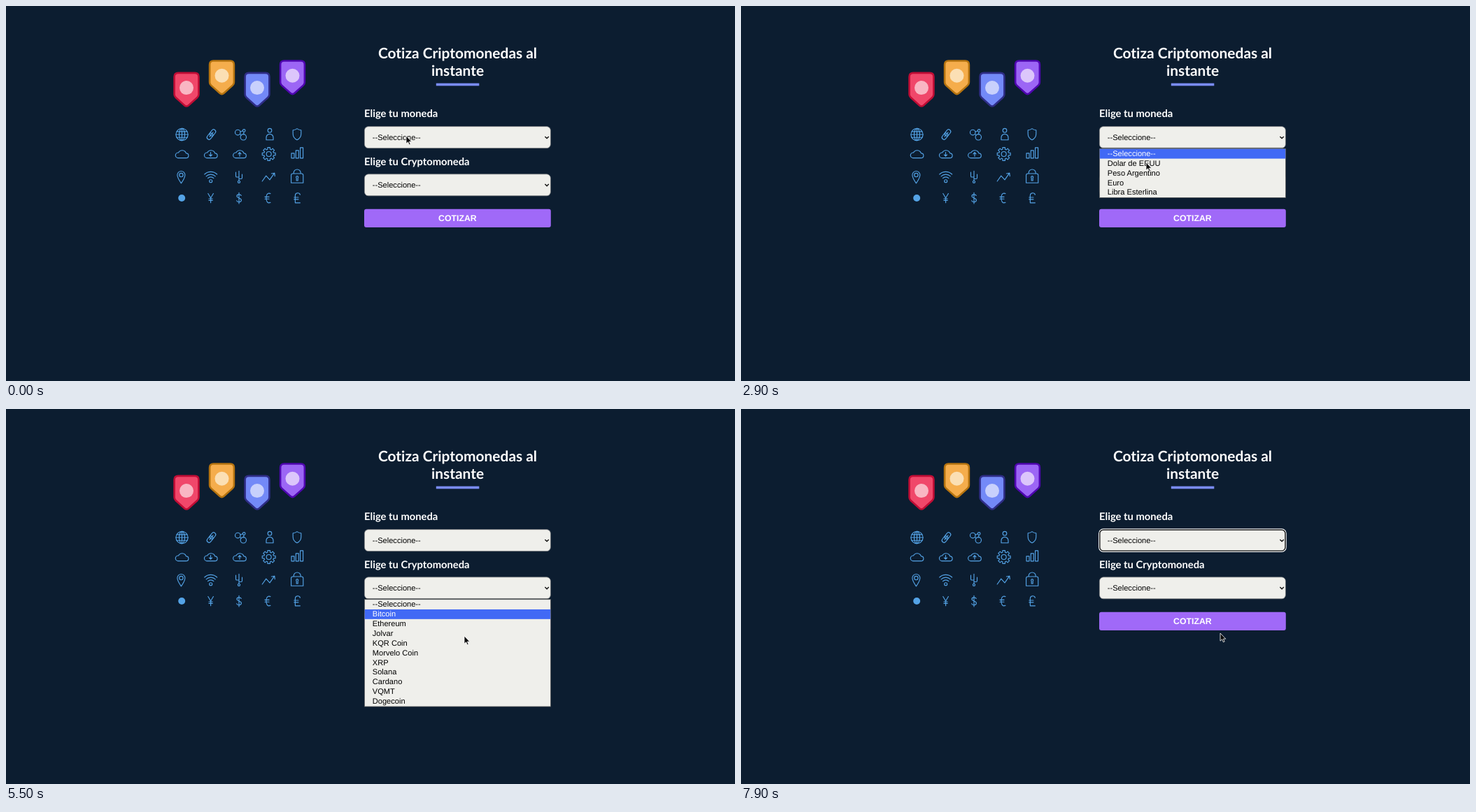
An HTML page for the animation above (8000 ms loop, 1042 px wide and 537 px high).

```html
<!DOCTYPE html>
<html lang="es">
<head>
<meta charset="utf-8">
<title>Cotiza Criptomonedas</title>
<style>
  html, body { margin: 0; width: 100%; height: 100%; overflow: hidden; background: #0c1d30; }
  svg { display: block; width: 1042px; height: 537px; }
  text { text-rendering: geometricPrecision; font-variant-ligatures: none; }
  .lato { font-family: Lato, sans-serif; font-weight: 700; fill: #fff; }
  .h1 { font-size: 20.92px; text-anchor: middle; }
  .label { font-size: 14.77px; }
  .ui { font-family: "Liberation Sans", Arial, sans-serif; font-size: 11.08px; fill: #000; }
  .btn { font-family: "Liberation Sans", Arial, sans-serif; font-weight: 700; font-size: 12.31px; fill: #fff; text-anchor: middle; }
  .icons { fill: none; stroke: #54a3e6; stroke-width: 1.15; stroke-linecap: round; stroke-linejoin: round; }
</style>
</head>
<body>
<svg viewBox="0 0 1042 537" xmlns="http://www.w3.org/2000/svg">
  <rect width="1042" height="537" fill="#0c1d30"/>
  <g id="badges"></g>
  <g class="icons" id="icons">
    <!-- globe, chain, molecule, person, shield -->
    <g transform="translate(251.5 184)">
      <circle r="8.6"/><ellipse rx="4" ry="8.6"/>
      <path d="M0-8.6V8.6M-8.6 0H8.6M-7.4-4.2H7.4M-7.4 4.2H7.4"/>
    </g>
    <g transform="translate(293.5 184) rotate(-52)">
      <rect x="-1.8" y="-3" width="10" height="6" rx="3"/>
      <rect x="-8.2" y="-3" width="10" height="6" rx="3"/>
      <path d="M-4 0H4"/>
    </g>
    <circle cx="331.3" cy="181" r="3.8"/><circle cx="339.3" cy="187.8" r="4.2"/><circle cx="340.2" cy="178.4" r="1.8"/>
    <path d="M334.3 183.4L336.1 185M335 180L338.4 178.8M340 180.3L339.6 183.6"/>
    <circle cx="377" cy="178.2" r="2.8"/>
    <path d="M372 191.7V188.3A5 5 0 0 1 382 188.3V191.7Z"/>
    <path d="M416 175.6Q413.5 177.6 410.2 177.7V183Q410.2 189 416 191.7Q421.8 189 421.8 183V177.7Q418.5 177.6 416 175.6Z"/>
    <!-- cloud arrows, gear hub -->
    <path d="M292.5 209.5V215M290.5 213L292.5 215.2L294.5 213M334 215.2V209.8M332 211.8L334 209.6L336 211.8"/>
    <circle cx="375.7" cy="212" r="3.5"/>
    <!-- pin, wifi dot, trident, trend, lock -->
    <path d="M250.4 253.8C247.5 249.6 244.9 246 244.9 242A5.5 5.5 0 0 1 255.9 242C255.9 246 253.3 249.6 250.4 253.8Z"/>
    <circle cx="250.4" cy="242" r="2.7"/>
    <circle cx="292.7" cy="250.7" r="2"/>
    <path d="M333 236.3V250.2M328.5 238V243.4Q328.5 245 330 245H333M337.5 241V246Q337.5 247.5 336 247.5H333"/>
    <circle cx="333" cy="251.8" r="1.6"/>
    <path d="M366.2 251L371.8 243.2L377 248.8L383.6 239.4M379.4 240L383.8 239.2L384.3 243.6"/>
    <path d="M410 240H422.4Q424.8 240 424.8 242.4V253.2H407.6V242.4Q407.6 240 410 240ZM411.2 240V239A5 5 0 0 1 421.2 239V240"/>
    <path d="M415.2 246.3V250H417.2V246.3A1.5 1.5 0 1 0 415.2 246.3"/>
    <!-- currency row -->
    <circle cx="251.2" cy="275" r="5" fill="#54a3e6" stroke="none"/>
    <path d="M288.8 268.5L292.6 275L296.4 268.5M292.6 275V281.7M290 276H295.2M290 278.4H295.2"/>
    <path d="M333 267.4V283M336.2 271.5C335.4 269.4 330 269 330 272.2C330 275.5 336.4 274.4 336.4 278C336.4 281.5 330.4 281.5 329.7 278.7"/>
    <path d="M377.9 268.6C373.8 267 371.9 270.4 371.9 275S373.8 283 377.9 281.4M370 273.4H376M370 276.2H376"/>
    <path d="M420.4 270.2C419.2 266.6 413.4 267 413.4 271.5V281.8H420.4M411.8 274H418M411.8 276.8H418"/>
  </g>

  <text class="lato h1" x="645.5" y="74.5">Cotiza Criptomonedas al</text>
  <text class="lato h1" x="645.5" y="99.6">instante</text>
  <rect x="614.8" y="110.6" width="61.5" height="3.7" fill="#7a8cf5"/>
  <text class="lato label" x="512" y="159.4">Elige tu moneda</text>
  <text class="lato label" x="512" y="227.6">Elige tu Cryptomoneda</text>
  <rect x="512" y="290.8" width="266.8" height="26.3" rx="3" fill="#a069f8"/>
  <text class="btn" x="645.4" y="307.9">COTIZAR</text>
  <g id="form"></g>
  <path id="cursor" d="M0 0V11.2L2.6 8.8L4.4 12.8L6.2 12L4.4 8.2H7.8Z" fill="#0a0a0a" stroke="#fff" stroke-width=".8" stroke-linejoin="round"/>
</svg>
<script>
const NS = 'http://www.w3.org/2000/svg';
const $ = id => document.getElementById(id);
const LOOP = 8000, STEP = 100, ROW = 13.87;

function add(parent, tag, attrs, text) {
  const el = document.createElementNS(NS, tag);
  for (const k in attrs) el.setAttribute(k, attrs[k]);
  if (text) el.textContent = text;
  parent.appendChild(el);
  return el;
}

// badges: fill, edge, mark; every second one hangs higher
const badges = [
  ['#f0476a', '#c00d35', '#f9b6c3'], ['#f5ad4c', '#b5730f', '#fbdfb4'],
  ['#7389f7', '#2f2d86', '#c8d0fc'], ['#9c66f5', '#4f06b0', '#dcc6fb']
];
badges.forEach(([fill, edge, mark], i) => {
  const y = i % 2 ? 77.2 : 94.6;
  const g = add($('badges'), 'g', { transform: `translate(${258 + 50.5 * i} ${y})` });
  add(g, 'path', {
    d: 'M-12 1.3H12Q17.4 1.3 17.4 6.7V32Q17.4 34.6 15.4 36.4L3 47.6Q0 50.2-3 47.6L-15.4 36.4Q-17.4 34.6-17.4 32V6.7Q-17.4 1.3-12 1.3Z',
    fill, stroke: edge, 'stroke-width': 2.6
  });
  add(g, 'circle', { cy: 22.5, r: 10, fill: mark });
});

// icons that follow a rule
const icon = (d, x = 0, y = 0) => add($('icons'), 'path', { d, transform: `translate(${x} ${y})` });
for (let i = 0; i < 3; i++) {
  icon('M-5.8 5.6H6A3.4 3.4 0 0 0 6-1.2A6 6 0 0 0-5-2A3.8 3.8 0 0 0-5.8 5.6Z', 251.5 + 41.2 * i, 212);
  const h = 7 + 4 * i, r = 6 + 3.4 * i, w = r * .7;
  icon(`M0 0H4V${-h}H0Z`, 408 + 6.3 * i, 217.8);
  icon(`M${-w} 0A${r} ${r} 0 0 1 ${w} 0`, 292.7, 246.6 - 2.8 * i);
}
let gear = '';
for (let i = 0; i < 32; i++) {
  const k = i % 4, r = k % 3 ? 9.6 : 7;
  const a = Math.PI / 4 * (i >> 2) + (k < 2 ? -1 : 1) * (k % 3 ? .18 : .27);
  gear += (i ? 'L' : 'M') + (r * Math.cos(a)).toFixed(2) + ' ' + (r * Math.sin(a)).toFixed(2);
}
icon(gear + 'Z', 375.7, 212);

// selects with their focus rings and option lists
function makeSelect(y) {
  const box = (parent, grow, attrs) => add(parent, 'rect', {
    x: 512.4 - grow, y: y + .3 - grow, width: 266 + 2 * grow, height: 31 + 2 * grow, rx: 5.6 + grow, ...attrs
  });
  const g = add($('form'), 'g');
  box(g, 0, { fill: '#efefeb', stroke: '#77797b', 'stroke-width': .7 });
  const ring = add(g, 'g', { fill: 'none' });
  box(ring, .75, { stroke: '#fff', 'stroke-width': 1.2 });
  box(ring, -.45, { stroke: '#101010', 'stroke-width': 1.3 });
  add(g, 'text', { class: 'ui', x: 523.8, y: y + 19.8 }, '--Seleccione--');
  add(g, 'path', { d: 'M-2.7-2.7L0 0L2.7-2.7', transform: `translate(773.1 ${y + 17.3})`, fill: 'none', stroke: '#111', 'stroke-width': 1.4 });
  return ring;
}

function makeList(y, names) {
  const g = add($('form'), 'g');
  add(g, 'rect', { x: 513, y: y - 2.2, width: 265, height: 2, opacity: .22 });
  add(g, 'rect', { x: 512.4, y: y - .4, width: 266.2, height: names.length * ROW + .8, fill: '#efefeb', stroke: '#55585a', 'stroke-width': .8 });
  const bar = add(g, 'rect', { x: 512.8, width: 265.4, height: ROW, fill: '#4169f5' });
  const items = names.map((n, i) => add(g, 'text', { class: 'ui', x: 523.8, y: y + 10.2 + i * ROW }, n));
  return { g, point(py) {
    const row = Math.max(0, Math.min(names.length - 1, Math.floor((py - y) / ROW)));
    bar.setAttribute('y', y + row * ROW);
    items.forEach((el, i) => el.style.fill = i === row ? '#fff' : '#000');
  } };
}

const rings = [makeSelect(172.3), makeSelect(240.5)];
const lists = [
  makeList(204.7, ['--Seleccione--', 'Dolar de EEUU', 'Peso Argentino', 'Euro', 'Libra Esterlina']),
  makeList(273.1, ['--Seleccione--', 'Bitcoin', 'Ethereum', 'Jolvar', 'KQR Coin', 'Morvelo Coin',
    'XRP', 'Solana', 'Cardano', 'VQMT', 'Dogecoin'])
];

// the two selects are opened and closed in turn
const visits = [[800, 3300], [4000, 5900], [6400, 7500]];

// pointer moves: start, number of steps, end x, end y
const moves = [
  [1300, 9, 576, 262], [2600, 4, 579, 224], [3000, 4, 807, 189],
  [3500, 1, 809, 199], [3700, 1, 715, 280], [4000, 1, 700, 257],
  [4200, 2, 690, 286], [4500, 2, 676, 318], [4800, 2, 655, 354],
  [5100, 2, 645, 431], [5300, 3, 655, 325], [5700, 3, 872, 255],
  [6100, 3, 648, 198], [6400, 1, 650, 192], [6800, 1, 769, 205],
  [6900, 1, 607, 212], [7300, 1, 821, 213], [7500, 5, 685, 321]
];

// position, plus the height one step further on, since the highlight runs ahead
function pointer(t) {
  let x = 572, y = 186, dy = 0;
  for (const [start, steps, ex, ey] of moves) {
    if (t < start) break;
    const k = Math.min(1, ((t - start) / STEP + 1) / steps);
    dy = (ey - y) / steps;
    x += (ex - x) * k;
    y += (ey - y) * k;
  }
  return { x, y, ahead: y + dy };
}

const show = (el, on) => el.style.display = on ? '' : 'none';

function draw(ms) {
  const t = Math.floor((ms % LOOP) / STEP) * STEP;
  const p = pointer(t);
  const n = visits.filter(([open]) => open <= t).length - 1;
  const isOpen = n >= 0 && t < visits[n][1];
  for (let i = 0; i < 2; i++) {
    const current = n >= 0 && n % 2 === i;
    show(rings[i], current && !isOpen);
    show(lists[i].g, current && isOpen);
    lists[i].point(p.ahead);
  }
  $('cursor').setAttribute('transform', `translate(${p.x.toFixed(2)} ${p.y.toFixed(2)})`);
}

let begin;
function tick(now) {
  begin ??= now;
  draw(now - begin);
  requestAnimationFrame(tick);
}
draw(0);
requestAnimationFrame(tick);
</script>
</body>
</html>
```
